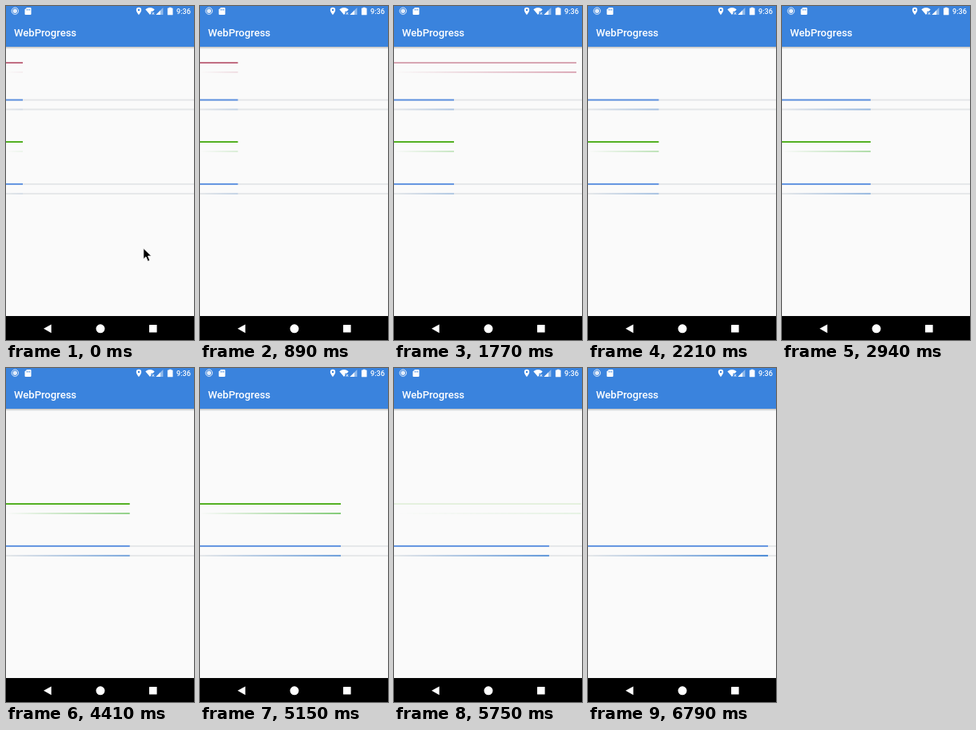
Animation, 235 px wide and 418 px high, one loop 8000 ms. Source, as an HTML page:

```html
<!DOCTYPE html>
<html lang="en">
<head>
<meta charset="utf-8">
<title>WebProgress</title>
<style>
  html, body { margin: 0; width: 100%; height: 100%; overflow: hidden; background: #fafafa; }
  svg { display: block; width: 235px; height: 418px; }
  text { font-family: Roboto, "Noto Sans", sans-serif; font-weight: 500; fill: #fff; }
</style>
</head>
<body>
<svg viewBox="0 0 235 418">
  <defs id="defs">
    <linearGradient id="shade" x2="0" y2="1">
      <stop stop-color="#000" stop-opacity=".24"/>
      <stop offset="1" stop-color="#000" stop-opacity="0"/>
    </linearGradient>
  </defs>
  <rect width="235" height="418" fill="#fafafa"/>
  <g id="bars"></g>

  <!-- app bar -->
  <rect y="51" width="235" height="3" fill="url(#shade)"/>
  <rect width="235" height="51" fill="#3a83dd"/>
  <text x="10" y="37.6" font-size="13.05">WebProgress</text>

  <!-- status bar -->
  <g fill="#fff">
    <circle cx="11.3" cy="6.2" r="4.2" fill="none" stroke="#fff" stroke-opacity=".85"/>
    <circle cx="11.3" cy="6.2" r="2.7" fill-opacity=".85"/>
    <path d="M26 2h4.6q.9 0 .9.9v7.2q0 .9-.9.9h-6.2q-.9 0-.9-.9V4.6z"/>
    <path d="M26 3.6v2M27.8 3.6v2M29.6 3.6v2" stroke="#3a83dd" stroke-width=".8"/>
    <path fill-rule="evenodd" d="M166 1.8a3.2 3.2 0 0 1 3.2 3.2c0 2.4-3.2 6.2-3.2 6.2s-3.2-3.8-3.2-6.2a3.2 3.2 0 0 1 3.2-3.2zm0 2a1.2 1.2 0 1 0 0 2.4 1.2 1.2 0 0 0 0-2.4z"/>
    <path d="M174.3 4.2q5.7-4.4 11.4 0l-2.1 2.6h-2.2v2.4l-1.4 1.8z"/>
    <path d="M182.6 8l2.6 2.8m0-2.8l-2.6 2.8" stroke="#fff" stroke-width=".9"/>
    <path d="M196.4 2v9h-9z" fill-opacity=".45"/>
    <path d="M193 5.4V11h-5.6z"/>
    <path d="M203.8 2.6v-.9h2.8v.9h1.4q.5 0 .5.5v7.6q0 .5-.5.5h-5.6q-.5 0-.5-.5V3.1q0-.5.5-.5z"/>
    <text x="213" y="9.7" font-size="9.1">9:36</text>
  </g>

  <!-- navigation bar -->
  <rect y="388" width="235" height="30"/>
  <g fill="#fff">
    <path d="M47 403.8l9.6-5.4v10.8z"/>
    <circle cx="118" cy="403.8" r="5.5"/>
    <rect x="179" y="399" width="9.6" height="9.6" rx=".6"/>
  </g>

  <path id="cursor" d="M0 0v13.6l3.1-2.9 2.4 5.6 2.6-1.1-2.4-5.4h4.3z" stroke="#fff" stroke-width=".9"/>
</svg>
<script>
const NS = 'http://www.w3.org/2000/svg';
const W = 235, LOOP = 8000, FADE = 600, STEPS = 46;

// Screen refresh times: 150 ms apart, a few 140 ms
const SHORT = [0, 7, 10, 14, 16, 18, 22, 26, 29, 32, 44];
const ticks = [0];
for (let i = 0; i < STEPS; i++) ticks.push(ticks[i] + (SHORT.includes(i) ? 140 : 150));

// Loading progress: [time, width]
const LOAD = [[0, 21], [890, 47.4], [1770, 75], [3830, 138], [5150, 176], [6790, 225]];

const groups = [
  { y: 70.3, gap: 11.8, h: 1.5, color: '#b0405c', end: '#b64766', finish: 1190 },
  { y: 116.6, gap: 11.9, h: 1.9, color: '#5b8fe0', end: '#387fd4', finish: 3200, track: true },
  { y: 169.2, gap: 11.9, h: 1.8, color: '#42a90c', end: '#4cb53c', finish: 5200 },
  { y: 221.9, gap: 12, h: 1.9, color: '#5b8fe0', end: '#387fd4', finish: Infinity, track: true }
];

function add(parent, name, attrs) {
  const el = document.createElementNS(NS, name);
  for (const key in attrs) el.setAttribute(key, attrs[key]);
  return parent.appendChild(el);
}

groups.forEach((g, i) => {
  const id = 'tint' + i;
  const tint = add(document.getElementById('defs'), 'linearGradient',
    { id, gradientUnits: 'userSpaceOnUse', x1: 0, x2: W, y1: 0, y2: 0 });
  add(tint, 'stop', { offset: 0, 'stop-color': g.end, 'stop-opacity': 0 });
  add(tint, 'stop', { offset: 1, 'stop-color': g.end });

  g.el = add(document.getElementById('bars'), 'g', {});
  const rows = [[g.y, g.color], [g.y + g.gap, `url(#${id})`]];
  if (g.track) rows.forEach(([y]) => add(g.el, 'rect', { y, width: W, height: g.h, fill: '#e4e6e8' }));
  g.bars = rows.map(([y, fill]) => add(g.el, 'rect', { y, height: g.h, fill }));
});

function loaded(t) {
  let i = 1;
  while (i < LOAD.length - 1 && t > LOAD[i][0]) i++;
  const [t0, w0] = LOAD[i - 1], [t1, w1] = LOAD[i];
  return w0 + (w1 - w0) * (t - t0) / (t1 - t0);
}

// Rush to 95 %, then creep to 100 % while fading out
function pose(g, t) {
  if (t < g.finish) return [loaded(t), 1];
  const from = loaded(g.finish), to = W * .95;
  const rush = (to - from) / W * 450, dt = t - g.finish;
  if (dt < rush) return [to - (to - from) * (1 - dt / rush) ** 2, 1];
  const k = Math.min((dt - rush) / FADE, 1);
  const e = .5 - Math.cos(Math.PI * k) / 2;
  return [to + (W - to) * e, 1 - e];
}

const cursor = document.getElementById('cursor');
const CURSOR_PATH = [[171.8, 303.2], [174.6, 304], [180, 362]];

function draw() {
  const now = performance.now() % LOOP;
  const n = ticks.findLastIndex(t => t <= now);
  for (const g of groups) {
    const [w, alpha] = pose(g, ticks[n]);
    g.el.setAttribute('opacity', alpha);
    g.bars.forEach(bar => bar.setAttribute('width', w));
  }
  const at = CURSOR_PATH[n];
  cursor.setAttribute('visibility', at ? 'visible' : 'hidden');
  if (at) cursor.setAttribute('transform', `translate(${at})`);
  requestAnimationFrame(draw);
}
draw();
</script>
</body>
</html>
```
